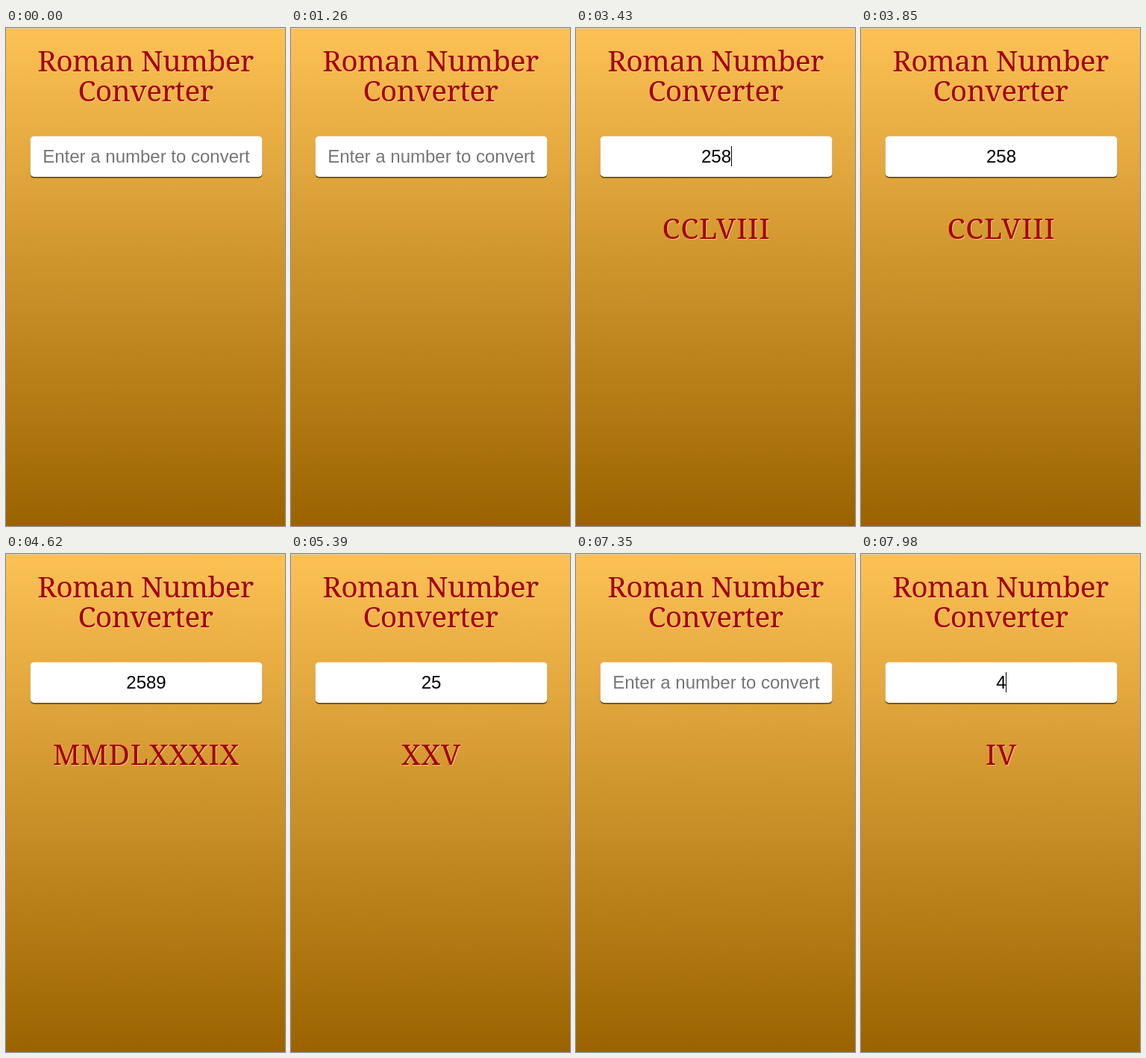
Animation, 374 px wide and 666 px high, one loop 8 s. Source, as an HTML page:

```html
<!DOCTYPE html>
<html lang="en">
<head>
<meta charset="utf-8">
<title>Roman Number Converter</title>
<style>
  html, body { margin: 0; height: 100%; overflow: hidden; }
  body { background: linear-gradient(#fdc155, #9b6300); }
  svg { display: block; width: 374px; height: 666px; }
  .roman {
    font: 39px "Noto Serif", "Liberation Serif", serif;
    fill: #a50005;
    text-anchor: middle;
    filter: drop-shadow(1px 1px .5px rgba(255, 222, 160, .65));
  }
  .title { letter-spacing: -.6px; }
  #result { letter-spacing: .8px; }
  #entry {
    font: 24px "Liberation Sans", Arial, sans-serif;
    text-anchor: middle;
  }
</style>
</head>
<body>
<svg viewBox="0 0 374 666">
  <rect width="374" height="1" fill="#ddd0ba"/>
  <g class="roman">
    <text class="title" x="187" y="58">Roman Number</text>
    <text class="title" x="187" y="98">Converter</text>
    <text id="result" x="188" y="282"></text>
  </g>
  <rect x="32.6" y="147" width="310.8" height="53.8" rx="5" fill="#66510f"/>
  <rect x="32.6" y="144.7" width="310.8" height="54.3" rx="5" fill="#fff"/>
  <text id="entry" x="188" y="180"></text>
  <rect id="caret" y="158" width="1" height="27"/>
</svg>
<script>
  const LOOP = 8000, CENTER = 188, DIGIT = 13.35;

  // [start in ms, value]; the result follows the key release.
  const typed = [[0, ""], [2520, "2"], [2940, "25"], [3360, "258"], [4130, "2589"],
    [4830, "258"], [5250, "25"], [5740, "2"], [6440, ""], [7910, "4"]];
  const converted = [[0, ""], [2520, "2"], [2940, "25"], [3430, "258"], [4200, "2589"],
    [4900, "258"], [5390, "25"], [5950, "2"], [6510, ""], [7980, "4"]];
  const caretToggles = [490, 980, 1470, 2030, 2380, 3850, 4130, 4620, 6440, 7000, 7490];

  const numerals = { M: 1000, CM: 900, D: 500, CD: 400, C: 100, XC: 90, L: 50,
    XL: 40, X: 10, IX: 9, V: 5, IV: 4, I: 1 };

  function toRoman(n) {
    let out = "";
    for (const [sign, size] of Object.entries(numerals)) {
      out += sign.repeat(Math.floor(n / size));
      n %= size;
    }
    return out;
  }

  const [entry, result, caret] = ["entry", "result", "caret"]
    .map(id => document.getElementById(id));
  const valueAt = (steps, t) => steps.filter(s => s[0] <= t).pop()[1];

  function setText(node, text) {
    if (node.textContent !== text) node.textContent = text;
  }

  function draw(now) {
    const t = now % LOOP;
    const value = valueAt(typed, t);
    const caretOn = caretToggles.filter(s => s <= t).length % 2;

    setText(entry, value || "Enter a number to convert");
    entry.setAttribute("fill", value ? "#000" : "#757575");
    setText(result, toRoman(+valueAt(converted, t)));
    caret.setAttribute("x", Math.floor(CENTER + value.length * DIGIT / 2));
    caret.setAttribute("visibility", caretOn ? "visible" : "hidden");
    requestAnimationFrame(draw);
  }
  draw(performance.now());
</script>
</body>
</html>
```
